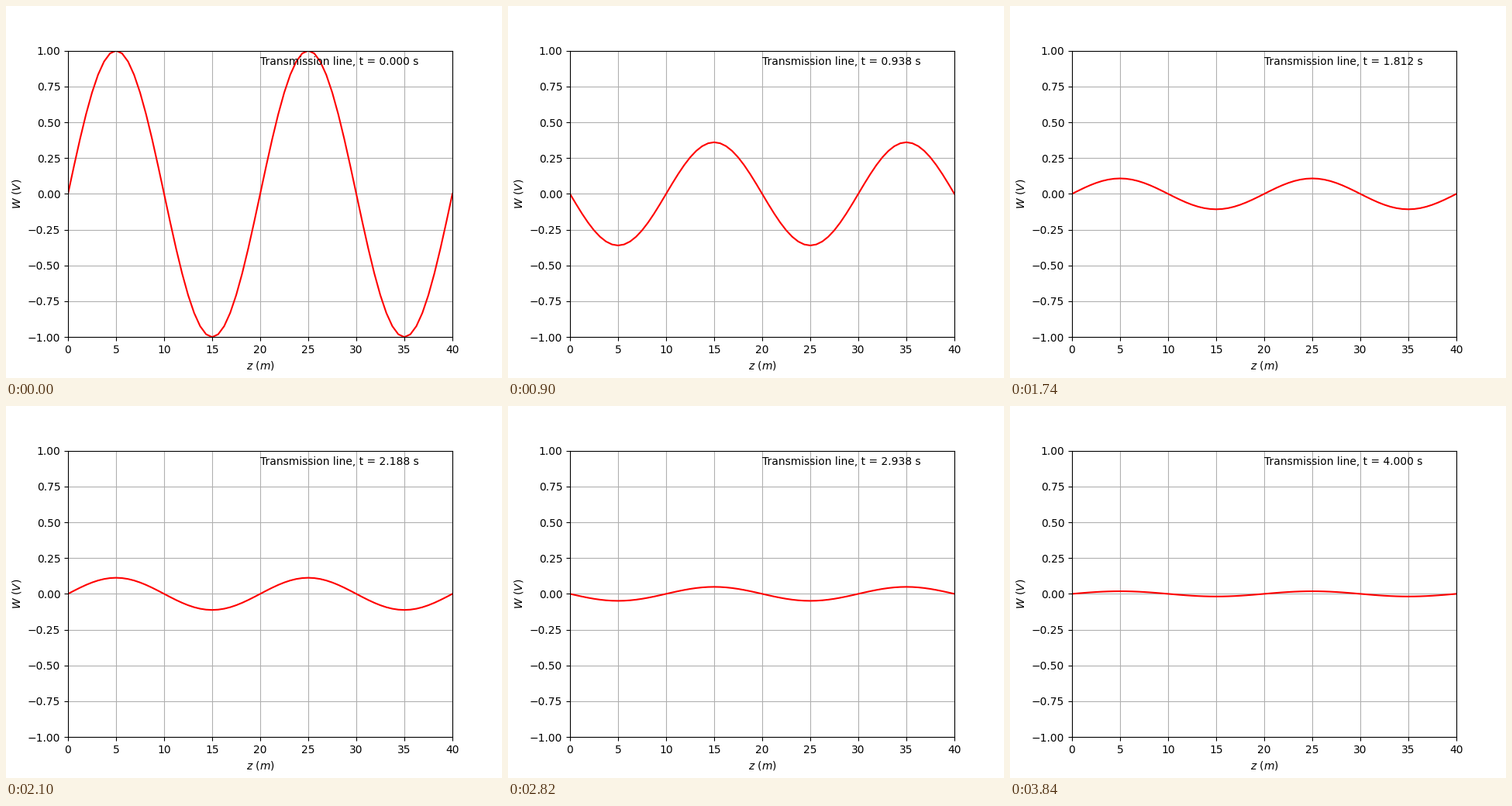
Animation, 640 px wide and 480 px high, one loop 3900 ms. Source, as a matplotlib script:

```python
import numpy as np
import matplotlib.pyplot as plt
from matplotlib.animation import FuncAnimation

LENGTH = 40.0      # m
WAVELENGTH = 20.0  # m
DZ = 0.625         # m
DT = 0.0625        # s
DAMPING = 1.0      # 1/s
STEPS = 65


def amplitudes(count):
    """Centred time stepping of a damped standing wave released from rest."""
    d = DAMPING * DT
    spring = 4 * np.sin(np.pi * DZ / WAVELENGTH) ** 2 + d ** 2
    a = [1.0, 1 - spring / 2]
    while len(a) < count:
        a.append(((2 - spring) * a[-1] - (1 - d) * a[-2]) / (1 + d))
    return a


z = np.linspace(0, LENGTH, int(LENGTH / DZ) + 1)
mode = np.sin(2 * np.pi * z / WAVELENGTH)
amp = amplitudes(STEPS)

fig, ax = plt.subplots(figsize=(6.4, 4.8), dpi=100)
ax.set_xlim(0, LENGTH)
ax.set_ylim(-1, 1)
ax.set_xlabel(r"$z\ (m)$")
ax.set_ylabel(r"$W\ (V)$")
ax.grid(True)
line, = ax.plot(z, mode, color="red", lw=1.5)
label = ax.text(20, 0.9, "")


def draw(i):
    line.set_ydata(amp[i] * mode)
    label.set_text(f"Transmission line, t = {i * DT:.3f} s")
    return line, label


anim = FuncAnimation(fig, draw, frames=STEPS, interval=60,
                     init_func=lambda: draw(0), repeat=True, repeat_delay=0)
plt.show()
```
